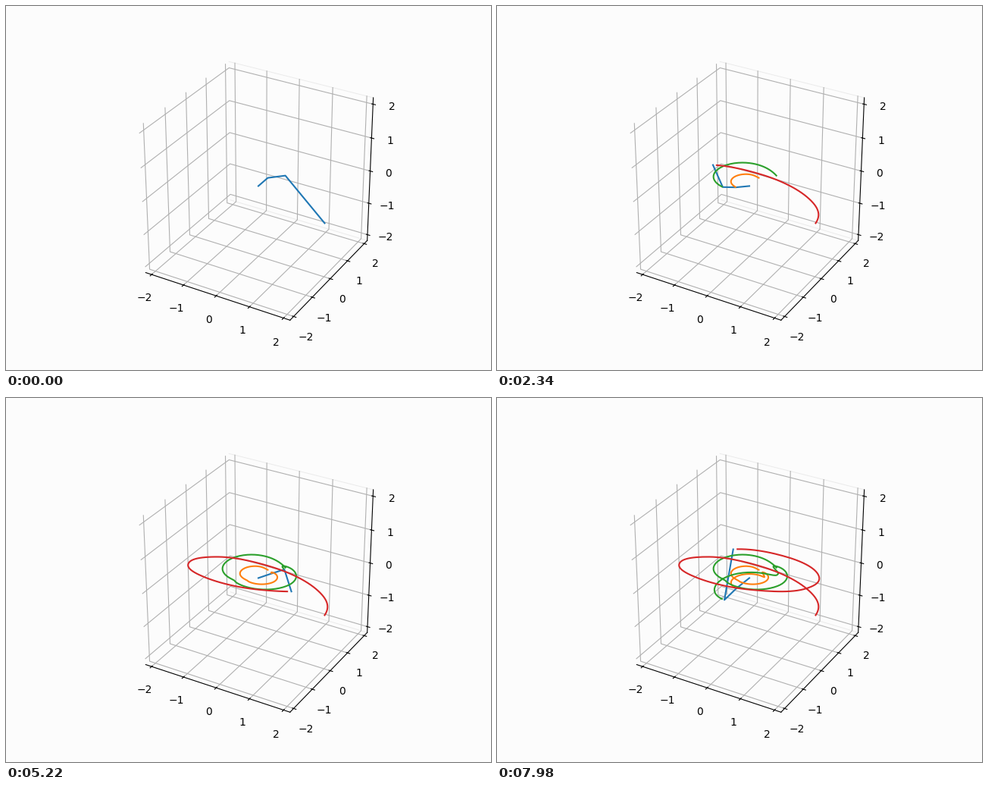
Animation of 640x480 px, one loop 8 s. Source, as a matplotlib script:

```python
import numpy as np
import matplotlib.pyplot as plt
from matplotlib.animation import FuncAnimation

W, H, DPI = 640, 480, 100
BG = "#fcfcfc"
TICK, STEP, LOOP = 20, 60, 8000    # timer tick, picture step, loop length in ms
KEY = 0.8                          # seconds between motion keys

# ---- camera: elev 30, azim -60, distance 10, perspective ----
ELEV, AZIM, DIST = np.radians(30), np.radians(-60), 10
VIEW = np.array([np.cos(ELEV) * np.cos(AZIM), np.cos(ELEV) * np.sin(AZIM), np.sin(ELEV)])
RIGHT = np.array([-np.sin(AZIM), np.cos(AZIM), 0])
UP = np.cross(VIEW, RIGHT)
SIDE = 0.77 * H
CX = 0.5125 * W - SIDE / 2 + SIDE * 0.95 / 1.85
CY = H - (0.11 * H + SIDE * 0.95 / 1.85)
ZOOM = SIDE / 0.185
LIM = 2.1
UNIT = 1.8294640721620434 / np.sqrt(3) / (2 * LIM)
BOX = LIM * 25 / 24
DELTA = 2 * LIM / 12
PAD = 11.5 * 48 / (2 * SIDE * 72 / DPI) * DELTA


def project(points):
    p = np.asarray(points, float) * UNIT
    k = ZOOM / (DIST - p @ VIEW)
    return CX + p @ RIGHT * k, CY - p @ UP * k


fig = plt.figure(figsize=(W / DPI, H / DPI), dpi=DPI, facecolor=BG)
ax = fig.add_axes([0, 0, 1, 1])
ax.set(xlim=(0, W), ylim=(H, 0))
ax.axis("off")


def stroke(points, color, width=0.8):
    ax.plot(*project(points), color=color, lw=width)


def draw_box():
    b = BOX
    for z in (b, -b):              # faint rims of the back pane
        stroke([(-b, b, z), (b, b, z)], "#ebebeb", 0.7)

    ticks = range(-2, 3)
    for t in ticks:
        stroke([(t, -b, -b), (t, b, -b), (t, b, b)], "#b0b0b0")
        stroke([(b, t, -b), (-b, t, -b), (-b, t, b)], "#b0b0b0")
        stroke([(-b, -b, t), (-b, b, t), (b, b, t)], "#b0b0b0")

    # axis index, fixed corner, direction of the tick marks
    for axis, corner, across in ((0, (0, -b, -b), 1), (1, (b, 0, -b), 0), (2, (b, b, 0), 0)):
        ends = np.array([corner, corner], float)
        ends[:, axis] = -b, b
        stroke(ends, "black")
        sign = np.sign(corner[across])
        for t in ticks:
            mark = np.array([corner, corner], float)
            mark[:, axis] = t
            mark[:, across] += sign * DELTA * np.array([0.2, -0.1])
            stroke(mark, "black")
            spot = np.array(corner, float) + PAD * np.sign(corner)
            spot[axis] = t
            x, y = project(spot)
            ax.text(x, y, str(t).replace("-", "\u2212"), ha="center", va="top",
                    fontsize=10, family="DejaVu Sans")


# ---- motion: two swinging links and a tip on a steady orbit ----
def glide(keys, t):
    """Smooth curve through keys spaced KEY seconds apart."""
    p = np.array(keys, float)
    m = np.gradient(p)
    i = np.clip((t / KEY).astype(int), 0, len(p) - 2)
    u = t / KEY - i
    return ((1 + 2 * u) * (1 - u) ** 2 * p[i] + u * (1 - u) ** 2 * m[i]
            + u * u * (3 - 2 * u) * p[i + 1] + u * u * (u - 1) * m[i + 1])


def turn(radius, degrees, z):
    """Points at a heading measured from the screen's right-hand side."""
    a = np.radians(degrees) - AZIM - np.pi / 6
    return np.column_stack([radius * np.cos(a), radius * np.sin(a), z])


def link(length, degrees, z):
    return turn(np.sqrt(length ** 2 - z ** 2), degrees, z)


t = np.arange(0, LOOP, STEP) / 1000
head1 = glide([60, 95, 178, 226, 246, 318, 402, 398, 403, 498, 588], t)
head2 = glide([20, 99, 202, 224, 236, 324, 410, 398, 435, 535, 592], t)
rise = glide([-0.78, -0.9, -0.69, -0.19, 0.36, 0.74, 0.72, 0.36, -0.04, -0.22, -0.12], t)

inner = link(0.5, head1, 0.15 * np.sin(2 * np.pi * t / 9.2))
middle = inner + link(0.5, head2, 0.19 * np.sin(2 * np.pi * t / 8.8 - 0.15))
outer = turn(1.835, 60.5 * t - 18.9, rise)
paths = [np.column_stack(project(p)) for p in (inner, middle, outer)]

draw_box()
arm, = ax.plot([], [], color="C0", lw=1.5)
trails = [ax.plot([], [], color=c, lw=1.5)[0] for c in ("C1", "C2", "C3")]


def update(frame):
    n = frame * TICK // STEP
    arm.set_data(*np.array([(CX, CY)] + [p[n] for p in paths]).T)
    for trail, p in zip(trails, paths):
        trail.set_data(p[:n, 0], p[:n, 1])
    return [arm, *trails]


anim = FuncAnimation(fig, update, frames=LOOP // TICK, interval=TICK,
                     repeat=True, repeat_delay=0, blit=False)
plt.show()
```
